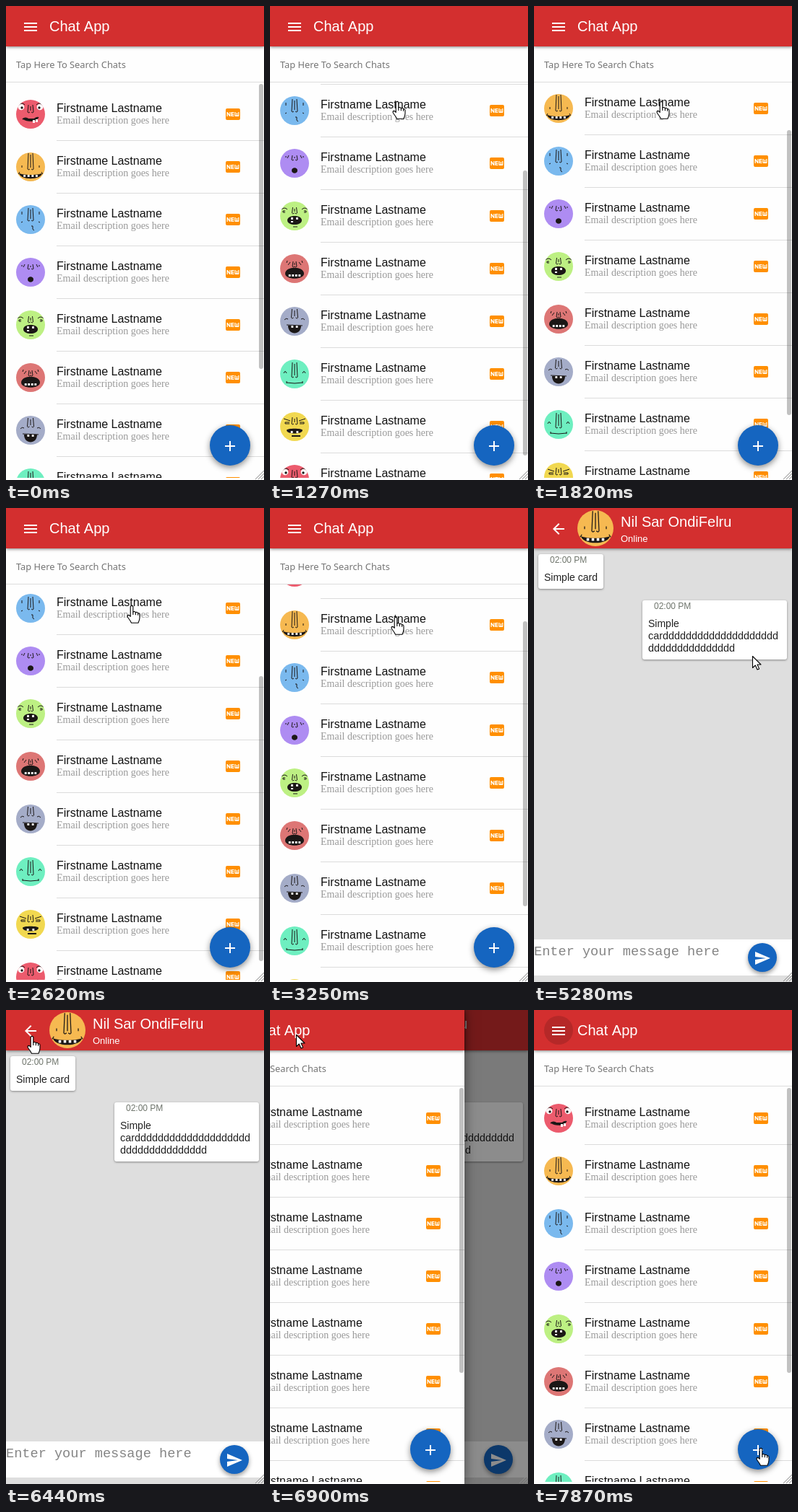
Recreate the animation shown at these times as an HTML page with a canvas. Size 357x657 px, loop 8 s.

```html
<!DOCTYPE html>
<html lang="en">
<head>
<meta charset="utf-8">
<title>Chat App</title>
<style>
html, body { margin: 0; width: 100%; height: 100%; overflow: hidden; background: #fff; }
canvas { display: block; width: 357px; height: 657px; }
</style>
</head>
<body>
<canvas id="stage" width="357" height="657"></canvas>
<script>
const W = 357, H = 657, LOOP = 8000;
const ctx = document.getElementById("stage").getContext("2d");
const SANS = '"Liberation Sans", Arial, sans-serif';
const SERIF = '"Liberation Serif", "Times New Roman", serif';
const MONO = '"Liberation Mono", "Courier New", monospace';
const NOTO = '"Noto Sans", sans-serif';
const RED = "#d32f2f", BLUE = "#1565c0", INK = "#1b1716";

const icons = {
  menu: new Path2D("M3 18h18v-2H3zM3 13h18v-2H3zM3 6v2h18V6z"),
  back: new Path2D("M20 11H7.83l5.59-5.59L12 4l-8 8 8 8 1.41-1.41L7.83 13H20z"),
  plus: new Path2D("M19 13h-6v6h-2v-6H5v-2h6V5h2v6h6z"),
  send: new Path2D("M2 21L23 12 2 3v7l15 2-15 2z"),
  badge: new Path2D("M20 4H4a2 2 0 0 0-2 2v12a2 2 0 0 0 2 2h16a2 2 0 0 0 2-2V6a2 2 0 0 0-2-2zM8.5 15H7.3l-2.55-3.5V15H3.5V9h1.2l2.6 3.5V9h1.2zm5-4.74H11v1.12h2.5v1.26H11v1.11h2.5V15h-4V9h4zm7 3.74a1 1 0 0 1-1 1h-4a1 1 0 0 1-1-1V9h1.25v4.51h1.13V10h1.25v3.5h1.12V9h1.25z")
};
const arrow = new Path2D("M.5 .5V16.5L4.3 13 7 19 9.6 17.9 7 12H12z");
const hand = new Path2D("M-1.8 1.5Q0-.8 1.8 1.5V9Q4 7.6 5.4 9.8 7.4 8.6 8.6 10.8 11 10.2 11 13V17Q11 20 9 24.3H-.5Q-2 21-5.5 16.5-6.8 13.6-4.4 13.4-3 13.6-1.8 15.5z");

const easeOut = u => 1 - (1 - u) ** 2;
const clamp = u => Math.max(0, Math.min(1, u));

const STEP = 75;
const hold = t => Math.floor((t + 10) / STEP) * STEP;

// Keys are [time, ...values]; returns the values between neighbours.
function track(keys, t, ease = u => u) {
  if (t <= keys[0][0]) return keys[0].slice(1);
  for (let i = 1; i < keys.length; i++) {
    const a = keys[i - 1], b = keys[i];
    if (t < b[0]) {
      const u = ease((t - a[0]) / (b[0] - a[0]));
      return a.slice(1).map((v, k) => v + (b[k + 1] - v) * u);
    }
  }
  return keys[keys.length - 1].slice(1);
}

const BOTTOM = 195;
const scrollKeys = [
  [1020, 0], [1505, BOTTOM], [1650, BOTTOM], [2070, 0],
  [2430, 0], [2779, BOTTOM], [2900, BOTTOM], [3640, 0]
];
const cursorKeys = [
  [650, 181, 152], [900, 176, 132], [2219, 176, 132], [2220, 174, 135],
  [2920, 174, 135], [3640, 174, 172], [4400, 174, 172], [4800, 302, 208],
  [5239, 302, 208], [5240, 302, 205], [5580, 302, 204], [6030, 62, 30],
  [6180, 24, 41], [6440, 36, 36], [6590, 36, 34], [7000, 36, 34],
  [7540, 338, 470], [7640, 338, 470], [7870, 314, 607]
];

function drawerAmount(t) {
  if (t < 5500) return (1 - clamp((t - 4420) / 300)) ** 3;
  return 1 - (1 - clamp((t - 6788) / 300)) ** 3;
}

function rect(x, y, w, h, color) {
  ctx.fillStyle = color;
  ctx.fillRect(x, y, w, h);
}
function round(x, y, w, h, r, color) {
  ctx.beginPath();
  ctx.roundRect(x, y, w, h, r);
  ctx.fillStyle = color;
  ctx.fill();
}
function disc(x, y, r, color) {
  ctx.beginPath();
  ctx.arc(x, y, r, 0, Math.PI * 2);
  ctx.fillStyle = color;
  ctx.fill();
}
function text(str, x, y, size, color, family = SANS) {
  ctx.font = `${size}px ${family}`;
  ctx.fillStyle = color;
  ctx.fillText(str, x, y);
}
function icon(name, x, y, color = "#fff") {
  ctx.save();
  ctx.translate(x, y);
  ctx.fillStyle = color;
  ctx.fill(icons[name], "evenodd");
  ctx.restore();
}
function shadowed(blur, dy, alpha, draw) {
  ctx.save();
  ctx.shadowColor = `rgba(0,0,0,${alpha})`;
  ctx.shadowBlur = blur;
  ctx.shadowOffsetY = dy;
  draw();
  ctx.restore();
}

// Face parts, centred on 0,0 inside a radius of 20.
function ink(path, width = 1) {
  ctx.strokeStyle = INK;
  ctx.lineWidth = width;
  ctx.stroke(new Path2D(path));
}
function nose(top, len, w) {
  ink(`M${-w} ${top}L${-w - 1} ${top + len}q1 2 3 0M${w} ${top}L${w + 1} ${top + len}q-1 2-3 0M0 ${top + 2}v${len - 4}`);
}
function eyes(x, y, shape) {
  for (const side of [1, -1]) {
    ctx.save();
    ctx.scale(side, 1);
    ink(`M${x} ${y}${shape}`);
    ctx.restore();
  }
}
// Black mouth between two heights, with teeth hanging at toothY.
function mouth(y, w, top, bottom, teeth = 0, toothY = y) {
  ctx.fillStyle = INK;
  ctx.fill(new Path2D(`M${-w} ${y}C${-w} ${y + top} ${w} ${y + top} ${w} ${y}C${w} ${y + bottom} ${-w} ${y + bottom} ${-w} ${y}`));
  const gap = w * 1.4 / teeth;
  for (let i = 0; i < teeth; i++) {
    rect((i - (teeth - 1) / 2) * gap - 1.4, toothY, 2.8, 3, "#fff");
  }
}

const faces = [
  ["#ec5b6d", () => {
    for (const side of [-1, 1]) {
      disc(side * 13, -10, 4.3, "#fff");
      disc(side * 12, -9, 1.7, INK);
    }
    eyes(8, -13, "q4-4 8 0");
    nose(-13, 10, 3);
    ink("M-11 7q4-3 8 0t8 0 6-2", 2);
    mouth(6, 10, 0, 5);
    rect(3, 8, 3, 4, "#fff");
    rect(7, 7, 3, 4, "#fff");
  }],
  ["#f6b951", () => { nose(-19, 22, 3); eyes(12, -2, "v3"); mouth(8, 16, 4, 11, 4, 11); eyes(15, 7, "l2 3"); }],
  ["#7ab9ee", () => { nose(-16, 17, 3); eyes(12, -11, "v4m-1 10l2 1"); ink("M1 9q3-1 2 2t2 4"); }],
  ["#ae8cf2", () => { nose(-11, 6, 3); eyes(8, -11, "l2 4m2-3v2"); mouth(10, 4, -5, 5); }],
  ["#bdf083", () => { nose(-12, 8, 2.5); eyes(10, -9, "q4-4 8 0m-5 2h3v2h-3"); mouth(6, 10, -8, 8, 2, 2); rect(-5, 7, 3, 2, "#fff"); ink("M-2 15h6"); }],
  ["#dd7675", () => { nose(-10, 7, 2); eyes(6, -9, "l3 4m1-6l1 3"); mouth(7, 13, -11, 9, 4, 8); }],
  ["#a4acc8", () => { nose(-17, 12, 3.5); eyes(9, -3, "q3-2 5 1"); mouth(6, 9, 0, 14, 2, 6); ink("M-11 5l22 1"); }],
  ["#6eefc0", () => { nose(-16, 20, 3); eyes(11, -1, "q2-5 4 0"); ink("M-11 12q11 2 22 0m0-2v3M-11 10v3"); }],
  ["#f1d850", () => { nose(-13, 9, 3); eyes(6, -8, "l9-3m-8 5h6v2h-6"); mouth(5, 11, -3, 6, 2, 6); ink("M-4 13h12", 2); }]
];

function avatar(kind, x, y, r) {
  const [tone, draw] = faces[kind % faces.length];
  ctx.save();
  ctx.translate(x, y);
  ctx.scale(r / 20, r / 20);
  disc(0, 0, 20, tone);
  ctx.clip();
  draw();
  ctx.restore();
}

function header() {
  shadowed(4, 1, 0.5, () => rect(0, 0, W, 56, RED));
}

function card(x, y, w, h, lines) {
  shadowed(3, 1, 0.4, () => round(x, y, w, h, 3, "#fff"));
  text("02:00 PM", x + 16, y + 12, 12, "#6f756c");
  lines.forEach(([line, size], i) => text(line, x + 8, y + 37 + i * 17, size, "#212121"));
}

function chatPage() {
  rect(0, 0, W, H, "#dedede");
  header();
  icon("back", 22, 17);
  avatar(1, 85, 28, 25);
  text("Nil Sar OndiFelru", 120, 26, 20, "#fff");
  text("Online", 120, 47, 13, "#fff");
  card(6, 64, 90, 48, [["Simple card", 14]]);
  card(150, 128, 200, 82, [
    ["Simple", 14], ["car" + "d".repeat(20), 14.4], ["d".repeat(15), 14.4]
  ]);
  rect(0, 598, W, 50, "#fff");
  text("Enter your message here", 0, 620, 18.6, "#858585", MONO);
  shadowed(6, 3, 0.4, () => disc(316, 623, 20, BLUE));
  icon("send", 304, 612);
}

function ripple(t) {
  rect(0, 114, W, 72, "#f2f2f2");
  ctx.save();
  ctx.beginPath();
  ctx.rect(0, 114, W, 72);
  ctx.clip();
  const age = t - 4200;
  disc(173, 172, 65 + age * 0.6, `rgba(0,0,0,${0.1 * (1 - clamp((age - 100) / 300))})`);
  ctx.restore();
}

function chatList(t) {
  const scroll = Math.round(track(scrollKeys, t, easeOut)[0]);
  ctx.save();
  ctx.beginPath();
  ctx.rect(0, 106, W, 548);
  ctx.clip();
  if (t >= 4200 && t < 4810) ripple(t);
  for (let i = 0; i < 10; i++) {
    const y = 114 + i * 73 - scroll;
    avatar(i, 34, y + 36, 20);
    text("Firstname Lastname", 70, y + 33, 16, "#111");
    text("Email description goes here", 70, y + 49, 14, "#999", SERIF);
    icon("badge", 302, y + 24, "#ff8f00");
    rect(70, y + 72, W - 70, 1, "#dcdcdc");
  }
  round(350, 108 + Math.round(scroll * 0.796), 6, 395, 3, "rgba(0,0,0,.24)");
  ctx.restore();
}

function drawer(t, amount) {
  ctx.save();
  ctx.translate(Math.round((amount - 1) * W), 0);
  shadowed(16, 0, 0.5, () => rect(0, 0, W, H, "#fefefe"));
  header();
  if (t > 6740) disc(34, 28, 20, "rgba(0,0,0,.14)");
  icon("menu", 22, 17);
  text("Chat App", 60, 35, 20, "#fff");
  text("Tap Here To Search Chats", 14, 86, 12.8, "#757575", NOTO);
  rect(0, 105, W, 1, "#dcdcdc");
  chatList(t);
  shadowed(8, 3, 0.45, () => disc(310, 609, 28, BLUE));
  icon("plus", 298, 598);
  ctx.restore();
}

function resizeGrip() {
  ctx.strokeStyle = "#8c8c8c";
  ctx.lineWidth = 1;
  for (const d of [4, 8, 12]) {
    ctx.beginPath();
    ctx.moveTo(W - d, H - 1);
    ctx.lineTo(W, H - 1 - d);
    ctx.stroke();
  }
}

function cursor(t) {
  if (t < 650 || (t >= 6020 && t < 6180)) return;
  const [x, y] = track(cursorKeys, t);
  const pointing = t < 4400 || (t >= 6180 && t < 6740) || t >= 7100;
  const shape = pointing ? hand : arrow;
  ctx.save();
  ctx.translate(Math.round(x), Math.round(y));
  ctx.fillStyle = "#fff";
  ctx.strokeStyle = "#000";
  ctx.lineWidth = 1.1;
  ctx.lineJoin = "round";
  ctx.fill(shape);
  ctx.stroke(shape);
  if (pointing) ctx.stroke(new Path2D("M1.8 9v4M5.4 9.8v3.5M8.6 10.8v3"));
  ctx.restore();
}

function render(t) {
  const amount = drawerAmount(t);
  if (amount < 1) {
    chatPage();
    rect(0, 0, W, H, `rgba(0,0,0,${0.6 * amount})`);
  }
  if (amount > 0) drawer(t, amount);
  resizeGrip();
  cursor(t);
}

const start = performance.now();
function tick() {
  render(hold((performance.now() - start) % LOOP));
  requestAnimationFrame(tick);
}
tick();
</script>
</body>
</html>
```
